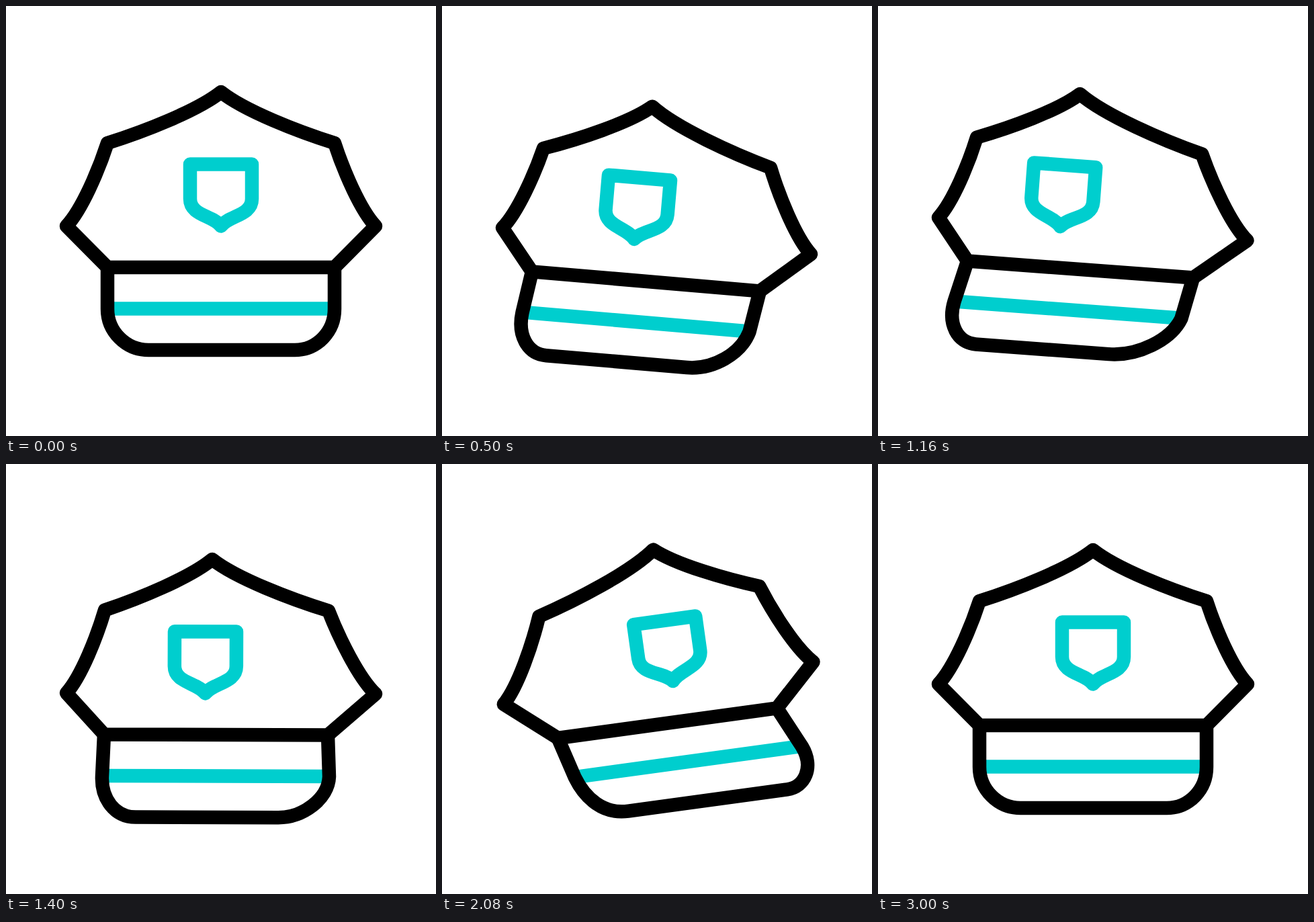
An HTML page for the animation above (3.6 s loop, 640 px wide and 640 px high).

```html
<!DOCTYPE html>
<html lang="en">
<head>
<meta charset="utf-8">
<title>Cap</title>
<style>
html, body { margin: 0; width: 100%; height: 100%; overflow: hidden; background: #fff; }
svg { display: block; width: 100%; height: 100%; }
path { fill: none; stroke: #000; stroke-width: 20.5; stroke-linecap: round; stroke-linejoin: round; }
.accent { stroke: #00cece; }
#stripe { stroke-linecap: butt; }
</style>
</head>
<body>
<svg viewBox="0 0 640 640">
  <path id="stripe" class="accent"/>
  <path id="badge" class="accent"/>
  <path id="brim"/>
  <path id="crown"/>
</svg>
<script>
const LOOP = 3600, MOVE = 3000, STEP = 20;

// Monotone cubic curve through the keys, at rest on both ends
function curve(times, values) {
  const last = times.length - 1;
  const slope = i => (values[i + 1] - values[i]) / (times[i + 1] - times[i]);
  const tangents = values.map((_, i) => {
    if (i === 0 || i === last) return 0;
    const a = slope(i - 1), b = slope(i);
    return a * b > 0 ? 2 * a * b / (a + b) : 0;
  });
  return t => {
    let i = 0;
    while (i < last - 1 && t >= times[i + 1]) i++;
    const h = times[i + 1] - times[i], u = (t - times[i]) / h, v = 1 - u;
    return v * v * (1 + 2 * u) * values[i] + u * u * (3 - 2 * u) * values[i + 1]
      + h * u * v * (v * tangents[i] - u * tangents[i + 1]);
  };
}

const TIMES = [0, 500, 940, 1400, 1680, 1920, 2480, MOVE];
const keyed = (...values) => curve(TIMES, [0, ...values, 0]);

// Tilt, bob, and the sideways shift of each corner
const motion = {
  tilt: keyed(.0855, .1065, .003, -.1196, -.146, -.077),
  bob: curve([0, 500, 570, 920, 1400, 1490, 1680, 1920, 2480, MOVE],
             [0, 22.3, 25, -1, 14, 17.5, 7, -1.5, .2, 0]),
  peak: keyed(-7, -22.5, -13, -6, -6, -3),
  shoulderL: keyed(0, -4, -4, -5, -7, -4),
  shoulderR: keyed(0, -5, -9, -16.5, -18, -9),
  sideL: keyed(0, 0, 0, 1.5, 2, 1),
  sideR: keyed(-1, -1, 0, 0, 3, 0),
  bandL: keyed(-17, -23.5, -5, 17.5, 23, 12),
  bandR: keyed(-16, -24.5, -10, 6, 10, 6),
  mid: keyed(-31.5, -51, -8, 41, 50, 26),
  baseL: keyed(-57, -88, -19, 57, 70, 36),
  baseR: keyed(-66, -115, -25, 73, 90, 46),
  badge: keyed(-26, -50.5, -23, 6, 12, 6)
};

const draw = (id, d) => document.getElementById(id).setAttribute("d", d);
const str = p => p.map(n => n.toFixed(2)).join(" ") + " ";

// Curve from a to b; each handle is a share of the chord plus a sag across it
function bow(a, b, [along1, sag1], [along2, sag2], side) {
  const dx = b[0] - a[0], dy = b[1] - a[1];
  const handle = (f, s) =>
    str([a[0] + f * dx - side * s * dy, a[1] + f * dy + side * s * dx]);
  return "C" + handle(along1, sag1) + handle(along2, sag2) + str(b);
}
const ROOF = [[.234, .06], [.697, .036]];
const FLANK = [[.302, .044], [.767, .071]];
const flip = pair => pair.map(([f, s]) => [1 - f, s]).reverse();

function render(t) {
  const m = {};
  for (const name in motion) m[name] = motion[name](t);
  const at = (x, y) => [x, y + m.bob + m.tilt * (x - 320)];
  const pt = (x, y) => str(at(x, y));

  const peak = at(320 + m.peak, 128);
  const shL = at(151 + m.shoulderL, 204), shR = at(489 + m.shoulderR, 204);
  const sideL = at(90 + m.sideL, 327.5), sideR = at(550 + m.sideR, 327.5);
  const bandL = 151 + m.bandL, bandR = 489 + m.bandR;
  const midL = 151 + m.mid, midR = 489 + m.mid;
  const baseL = 212 + m.baseL, baseR = 430 + m.baseR;

  draw("crown",
    "M" + str(peak) + bow(peak, shL, ...ROOF, -1) + bow(shL, sideL, ...FLANK, -1) +
    "L" + pt(bandL, 389) + "L" + pt(bandR, 389) + "L" + str(sideR) +
    bow(sideR, shR, ...flip(FLANK), -1) + bow(shR, peak, ...flip(ROOF), -1) + "Z");

  // Handles of one rounded brim corner; dir points from the side inwards
  const corner = (band, mid, base, dir) => {
    const extra = (base - mid) * dir - 61;
    return [
      pt(mid + .5 * (mid - band) + dir * .15 * Math.max(0, extra), 484.5),
      pt(base - dir * (33.5 + .2 * extra), 512)
    ];
  };
  const [l1, l2] = corner(bandL, midL, baseL, 1);
  const [r1, r2] = corner(bandR, midR, baseR, -1);
  draw("brim",
    "M" + pt(bandL, 389) + "L" + pt(midL, 451) +
    "C" + l1 + l2 + pt(baseL, 512) + "L" + pt(baseR, 512) +
    "C" + r2 + r1 + pt(midR, 451) + "L" + pt(bandR, 389));

  draw("stripe", "M" + pt(midL, 450.5) + "L" + pt(midR, 450.5));

  const b = (x, y) => pt(x + m.badge - m.tilt * (y - 235.5), y);
  draw("badge",
    "M" + b(274, 235.5) + "L" + b(366, 235.5) + "L" + b(366, 287) +
    "C" + b(366, 312) + b(332, 311.5) + b(320, 327.5) +
    "C" + b(308, 311.5) + b(274, 312) + b(274, 287) + "Z");
}

const start = performance.now();
function tick() {
  const t = Math.max(0, performance.now() - start) % LOOP;
  render(Math.min(MOVE, Math.floor(t / STEP) * STEP));
  requestAnimationFrame(tick);
}
tick();
</script>
</body>
</html>
```
